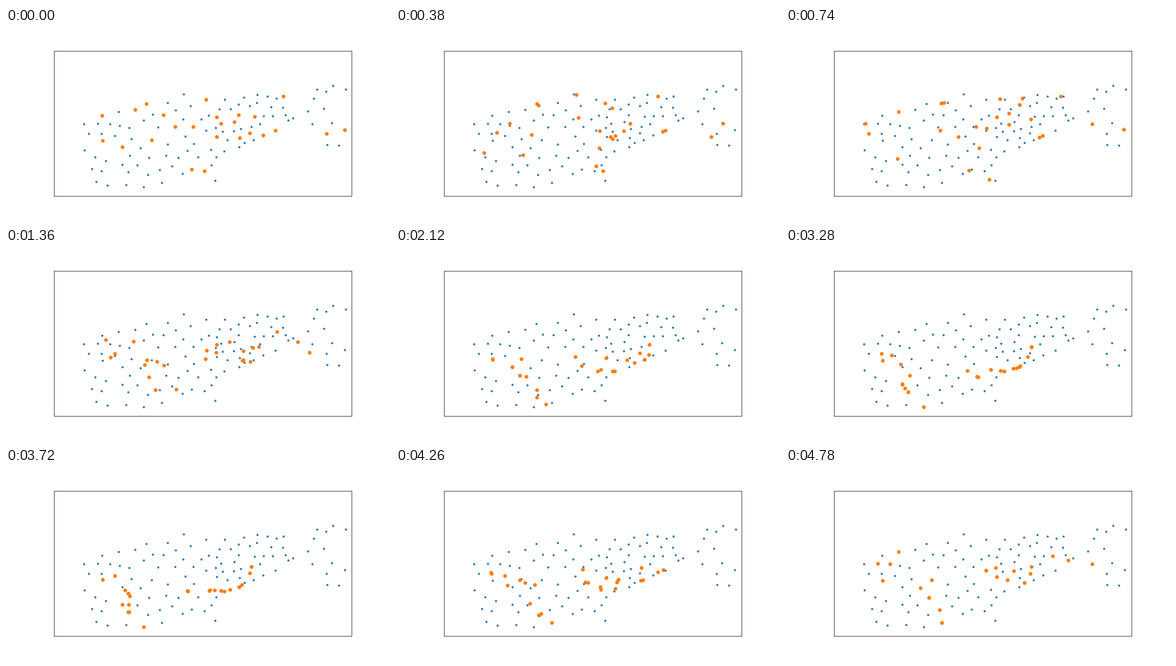
A matplotlib script for the animation above (4.8 s loop, 720 by 360 pixels).

```python
import numpy as np
import matplotlib.pyplot as plt
from matplotlib.animation import FuncAnimation

FRAMES, INTERVAL = 240, 20
W, H, DPI = 720, 360, 72
LEFT, RIGHT, TOP, BOTTOM = 90, 648, 43.2, 315
HOP = 22            # frames from one node to the next
FILL = 56           # nodes scattered inside the outline
WEST_WALKERS = 11   # the others gather on the eastern path

rng = np.random.default_rng(7)

# Stage pixels from the top left corner; all of these points are nodes
STARTS = np.array([
    (180, 164), (181, 211), (218, 223), (242, 153), (263, 142),
    (273, 210), (295, 163), (317, 185), (348, 265), (351, 185),
    (372, 268), (375, 134), (395, 167), (395, 204), (403, 179),
    (428, 176), (436, 163), (438, 206), (457, 197), (466, 166),
    (482, 201), (505, 192), (520, 128), (601, 198), (635, 191),
], float)
UPPER_EDGE = np.array([
    (146, 180), (180, 164), (263, 142), (303, 140), (333, 124),
    (410, 134), (471, 125), (520, 128), (538, 169),
], float)
LOWER_EDGE = np.array([
    (147, 229), (169, 288), (190, 295), (258, 298), (292, 290), (331, 273),
    (392, 286), (394, 242), (437, 223), (505, 192), (538, 169),
], float)
ISLAND = np.array([
    (566, 156), (574, 180), (577, 132), (583, 115), (596, 151), (600, 119),
    (602, 219), (611, 178), (613, 108), (624, 220), (637, 115),
], float)
WEST_PATH = np.array([(179, 198), (232, 239), (218, 256), (229, 270),
                      (258, 298)], float)
EAST_PATH = np.array([(340, 230), (384, 228), (409, 231), (447, 215),
                      (460, 185)], float)


def distances(points, target):
    return np.hypot(*(points - target).T)


def scatter_nodes():
    """Fill the outline from west to east, keeping nodes well apart."""
    nodes = np.unique(np.vstack([STARTS, UPPER_EDGE, LOWER_EDGE, ISLAND,
                                 WEST_PATH, EAST_PATH]), axis=0)
    for x in np.linspace(154, 530, FILL):
        x += rng.uniform(-3, 3)
        high = np.interp(x, *UPPER_EDGE.T)
        low = np.interp(x, *LOWER_EDGE.T)
        spots = [(x, y) for y in rng.uniform(high, low, 12)]
        best = max(spots, key=lambda spot: distances(nodes, spot).min())
        nodes = np.vstack([nodes, np.round(best)])
    return nodes


def along(path, share):
    """Point at a share of the path's length."""
    steps = np.hypot(*np.diff(path, axis=0).T)
    length = np.concatenate([[0], np.cumsum(steps)])
    at = np.clip(share, 0, 1) * length[-1]
    return np.array([np.interp(at, length, path[:, 0]),
                     np.interp(at, length, path[:, 1])])


def smooth(t, start, end):
    u = np.clip((t - start) / (end - start), 0, 1)
    return u * u * (3 - 2 * u)


def pull(t):
    """How strongly walkers gather: rising, holding, then half released."""
    return smooth(t, 20, 135) - 0.5 * smooth(t, 186, 239)


def build_track(i):
    """Stops of one walker, each at the node nearest to its drifting goal."""
    if i < WEST_WALKERS:
        path, share = WEST_PATH, i / (WEST_WALKERS - 1)
    else:
        rest = len(STARTS) - WEST_WALKERS
        path, share = EAST_PATH, (i - WEST_WALKERS) / (rest - 1)
    phase = rng.uniform(0, 2 * np.pi)
    times = [0]
    stops = [STARTS[i]]
    for t in rng.uniform(0.4, 1) * HOP + HOP * np.arange(FRAMES // HOP + 1):
        angle = phase + 2 * np.pi * t / 90
        spot = along(path, share + 0.1 * np.sin(angle))
        amount = pull(t)
        roam = 38 * (1 - amount) * np.array([np.cos(angle), np.sin(angle)])
        goal = STARTS[i] + amount * (spot - STARTS[i]) + roam
        times.append(t)
        stops.append(NODES[np.argmin(distances(NODES, goal))])
    return np.array(times), np.array(stops)


NODES = scatter_nodes()
TRACKS = [build_track(i) for i in range(len(STARTS))]

fig = plt.figure(figsize=(W / DPI, H / DPI), dpi=DPI, facecolor="white")
ax = fig.add_axes([LEFT / W, 1 - BOTTOM / H,
                   (RIGHT - LEFT) / W, (BOTTOM - TOP) / H])
ax.set(xlim=(LEFT, RIGHT), ylim=(BOTTOM, TOP), xticks=[], yticks=[])
ax.plot(*NODES.T, ".", color="C0", markersize=6)
walkers, = ax.plot([], [], "o", color="C1", markersize=6)


def update(frame):
    walkers.set_data([np.interp(frame, t, p[:, 0]) for t, p in TRACKS],
                     [np.interp(frame, t, p[:, 1]) for t, p in TRACKS])
    return walkers,


anim = FuncAnimation(fig, update, frames=FRAMES, interval=INTERVAL,
                     repeat=True, repeat_delay=0)
plt.show()
```
